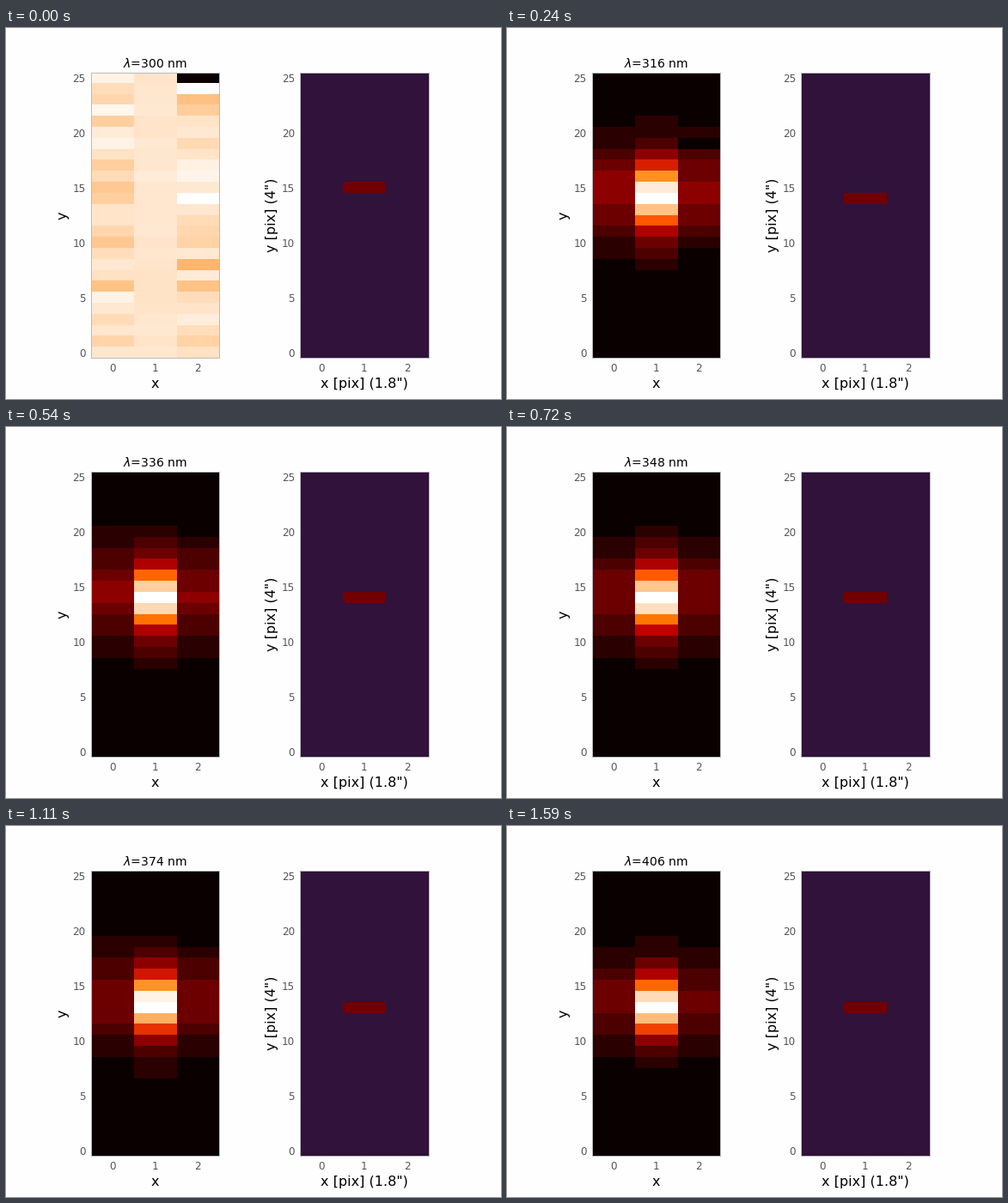
A matplotlib script that plays this animation: 576x432 px, repeating every 1620 ms.

```python
import numpy as np
import matplotlib.pyplot as plt
from matplotlib.animation import FuncAnimation
from matplotlib.colors import ListedColormap

ROWS, COLS = 26, 3
FRAMES, INTERVAL = 54, 30
FLOOR, STEP = .03, .085
PEAK_MAP = ListedColormap(["#30123b", "#710000"])


def center(k):
    """Row of the source, drifting down with wavelength."""
    return np.interp(k, [0, 12, 24, 37, 53],
                     [14.7, 14.03, 13.87, 13.38, 13.15])


def profile(k):
    """Moffat spot, dimmer and slightly higher in the outer columns."""
    y = np.arange(ROWS)[:, None]
    dx2 = np.array([14.5, 0, 14.5])
    tilt = np.array([.5, 0, .4])
    r2 = dx2 + (y - center(k) - tilt) ** 2
    return (1 + r2 / (36 - k / 6)) ** -3


def exposure(k):
    """Spot rising out of detector noise and one fading cold pixel."""
    rng = np.random.default_rng(7 + k)
    sigma = .045 / (1 + (k / 5) ** 4)
    noise = sigma * rng.standard_normal((ROWS, COLS)) * [1, .1, 1]
    z = (1 - np.exp(-k)) * profile(k) + noise
    z[max(0, int(25 - .75 * k)), 2] -= 1.14 * np.exp(-k / 3)
    return z


def heat(k):
    """Normalised exposure with coarse steps in the dark half."""
    z = exposure(k)
    z = (z - z.min()) / (z.max() - z.min())
    coarse = FLOOR + STEP * np.round((z - FLOOR) / STEP)
    return np.where(z < .5, coarse, z)


def peak(k):
    z = np.zeros((ROWS, COLS))
    z[int(round(float(center(k)))), 1] = 1
    return z


def panel(ax, cmap, xlabel, ylabel):
    image = ax.imshow(np.zeros((ROWS, COLS)), cmap=cmap, vmin=0, vmax=1,
                      origin="lower", aspect=1 / 3.9,
                      interpolation="nearest")
    ax.set_xlabel(xlabel, fontsize=16)
    ax.set_ylabel(ylabel, fontsize=16)
    ax.set_xticks(range(COLS))
    ax.set_yticks(range(0, ROWS, 5))
    ax.tick_params(length=0, pad=6, labelsize=12, labelcolor="#555555")
    for spine in ax.spines.values():
        spine.set(color="#bcbcbc", linewidth=1)
    return image


plt.rcParams["font.family"] = "DejaVu Sans"
fig, (ax_slice, ax_peak) = plt.subplots(1, 2, figsize=(8, 6), dpi=72,
                                        facecolor="#fefefe")
fig.subplots_adjust(left=.125, right=.9, bottom=.11, top=.88, wspace=.2)
slice_image = panel(ax_slice, "gist_heat", "x", "y")
peak_image = panel(ax_peak, PEAK_MAP, 'x [pix] (1.8")', 'y [pix] (4")')
title = ax_slice.set_title("", fontsize=14, pad=6)


def update(k):
    slice_image.set_data(heat(k))
    peak_image.set_data(peak(k))
    title.set_text(rf"$\lambda$={300 + 2 * k} nm")
    return slice_image, peak_image, title


anim = FuncAnimation(fig, update, frames=FRAMES, interval=INTERVAL,
                     repeat=True, repeat_delay=0, blit=False)
plt.show()
```
